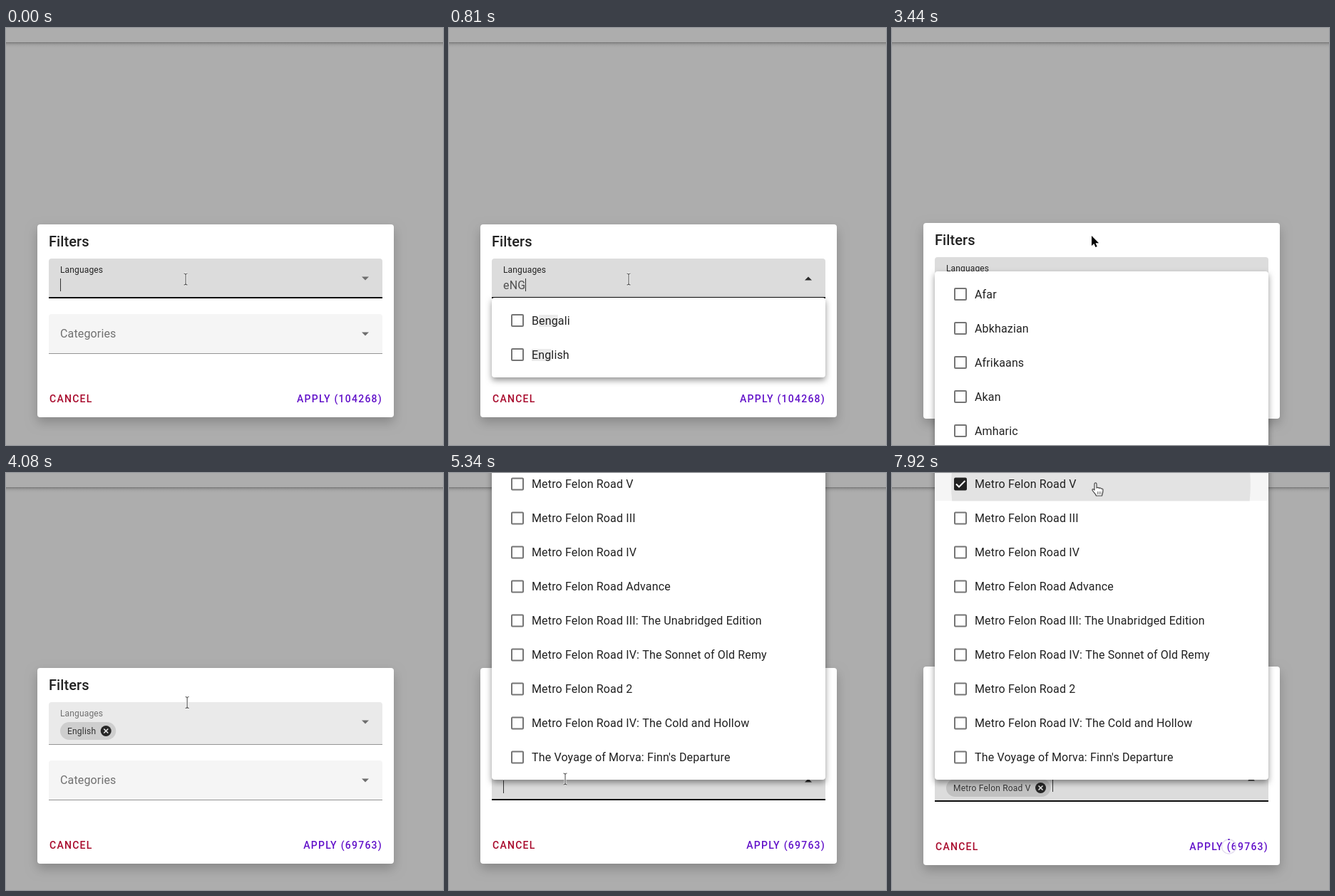
An HTML page with a canvas that plays this animation: 613x586 px, repeating every 8 s.

```html
<!DOCTYPE html>
<html lang="en">
<head>
<meta charset="utf-8">
<style>
html, body { margin: 0; width: 613px; height: 586px; overflow: hidden; background: #adadad; }
canvas { display: block; }
</style>
</head>
<body>
<canvas id="stage" width="613" height="586"></canvas>
<script>
const ctx = document.getElementById('stage').getContext('2d');
const LOOP = 8000, LEFT = 60, WIDTH = 468, CENTER = LEFT + WIDTH / 2;

const ALL_LANGUAGES = ['Afar', 'Abkhazian', 'Afrikaans', 'Akan', 'Amharic'];
const E_LANGUAGES = ['Aragonese', 'Assamese', 'Azerbaijani', 'Belarusian', 'Bengali'];
const EN_LANGUAGES = ['Bengali', 'English', 'French', 'Armenian'];
const SERIES = 'Metro Felon Road';
const GAMES = [
  ...['V', 'III', 'IV', 'Advance', 'III: The Unabridged Edition', 'IV: The Sonnet of Old Remy',
    '2', 'IV: The Cold and Hollow'].map(part => `${SERIES} ${part}`),
  "The Voyage of Morva: Finn's Departure"
];

const HAND = new Path2D('M-4-7c0-3 3-3 3 0v5c1-1 3-1 3.5 .5c1-1 2.5-.5 3 .7c1.5-.6 2.5 .3 2.5 1.8c0 4-1 5-1.5 8h-8c-1-3-3-4-5-7c-1.5-2 .5-3.5 2.5-1z');
const ARROW = new Path2D('M0 0v14l3.3-3 2.2 5 2.2-1-2.2-4.8h4.6z');
const BEAM = new Path2D('M-2.5-8Q0-8 0-6Q0-8 2.5-8M0-6V6M-2.5 8Q0 8 0 6Q0 8 2.5 8');

// time, x, y: the pointer eases between neighbouring stops
const POINTER = [
  [0, 252, 353], [1900, 252, 353], [2410, 201, 473], [2750, 201, 473], [3430, 280, 292],
  [3850, 280, 292], [4610, 163, 430], [6899, 163, 430], [6900, 240, 228],
  [7260, 366, 82], [7590, 288, 23], [LOOP, 288, 23]
];

const ramp = (t, from, to) => Math.min(1, Math.max(0, (t - from) / (to - from)));
const lerp = (a, b, p) => a + (b - a) * p;
const smooth = p => p * p * (3 - 2 * p);
const within = (t, from, to) => t >= from && t < to;

function box(x, y, w, h, color, radius = 0) {
  ctx.fillStyle = color;
  ctx.beginPath();
  ctx.roundRect(x, y, w, h, radius);
  ctx.fill();
}

function disc(x, y, r, color) {
  ctx.fillStyle = color;
  ctx.beginPath();
  ctx.arc(x, y, r, 0, 7);
  ctx.fill();
}

function line(color, width, ...points) {
  ctx.strokeStyle = color;
  ctx.lineWidth = width;
  ctx.beginPath();
  points.forEach(p => ctx.lineTo(...p));
  ctx.stroke();
}

function setFont(size, weight = 400, spacing = 0.15) {
  ctx.font = `${weight} ${size}px Roboto, sans-serif`;
  ctx.letterSpacing = spacing + 'px';
}

function text(str, x, y, color = '#212121') {
  ctx.fillStyle = color;
  ctx.fillText(str, x, y);
  return ctx.measureText(str).width;
}

function withShadow(offset, blur, alpha, draw) {
  ctx.save();
  ctx.shadowColor = `rgba(0,0,0,${alpha})`;
  ctx.shadowOffsetY = offset;
  ctx.shadowBlur = blur;
  draw();
  ctx.restore();
}

function backdrop() {
  box(0, 0, 613, 586, '#adadad');
  const shade = ctx.createLinearGradient(0, 20, 0, 28);
  shade.addColorStop(0, '#747474');
  shade.addColorStop(0.25, '#959595');
  shade.addColorStop(0.6, '#a7a7a7');
  shade.addColorStop(1, '#adadad');
  box(0, 20, 613, 8, shade);
}

function chip(label, y) {
  setFont(12, 400, 0.2);
  const w = ctx.measureText(label).width;
  box(76, y - 12, w + 38, 25, 'rgba(0,0,0,.12)', 12.5);
  text(label, 86, y + 4.5, '#333');
  const x = 100 + w;
  disc(x, y + 0.5, 7.5, '#262626');
  for (const s of [-1, 1]) line('#e4e4e4', 1.6, [x - 3, y + 0.5 - 3 * s], [x + 3, y + 0.5 + 3 * s]);
  return x + 16;
}

function field({ y, h, label, focus, hover, float, underline, open, value, tag, caret, typo }) {
  const grey = 245 - lerp(hover ? 11 : 0, 25, focus);
  box(LEFT, y, WIDTH, h, `rgb(${grey},${grey},${grey})`, [4, 4, 0, 0]);
  box(LEFT, y + h - 1, WIDTH, 1, '#949494');
  ctx.globalAlpha = Math.min(1, focus * 3);
  box(CENTER - WIDTH / 2 * underline, y + h - 2, WIDTH * underline, 2, '#0c0c0c');
  ctx.globalAlpha = 1;

  const size = lerp(16, 12, float), ink = lerp(112, 36, focus);
  setFont(size);
  text(label, 76, y + lerp(33, 20, float), `rgb(${ink},${ink},${ink})`);

  let caretX = 76;
  if (tag) caretX = chip(tag, y + 40);
  if (value) {
    setFont(16);
    caretX += text(value, 76, y + 43, '#505050');
    if (typo) {
      const wave = [];
      for (let x = 76; x <= caretX; x += 2) wave.push([x, y + 45.5 + (x / 2 % 2) * 2]);
      line('#e5383b', 1.1, ...wave);
    }
  }
  if (caret) box(Math.round(caretX), y + 28, 1, 18, '#333');

  const s = open ? -1 : 1, mid = y + 28;
  ctx.fillStyle = open ? '#2b2b2b' : '#6e6e6e';
  ctx.beginPath();
  ctx.moveTo(499, mid - 2.5 * s);
  ctx.lineTo(509, mid - 2.5 * s);
  ctx.lineTo(504, mid + 2.5 * s);
  ctx.fill();
}

function ripple(t, start, fromX, fromY, rowY) {
  if (t < start) return;
  const p = 1 - (1 - ramp(t, start, start + 225)) ** 2.3;
  ctx.save();
  ctx.beginPath();
  ctx.rect(LEFT, rowY - 24, WIDTH, 48);
  ctx.clip();
  box(LEFT, rowY - 24, WIDTH, 48, '#f5f5f5');
  disc(lerp(fromX, CENTER, p), lerp(fromY, rowY, p), lerp(47, 245, p),
    `rgba(0,0,0,${0.075 * ramp(t, start, start + 75)})`);
  ctx.restore();
}

function row(label, y, query, checked) {
  setFont(16);
  const at = query ? label.toLowerCase().indexOf(query) : -1;
  if (at >= 0) {
    const x = 116 + ctx.measureText(label.slice(0, at)).width;
    box(x, y - 8, ctx.measureText(label.slice(at, at + query.length)).width, 17, 'rgba(0,0,0,.08)');
  }
  text(label, 116, y + 5.5);
  if (checked) {
    box(87, y - 9, 18, 18, '#212121', 2);
    line('#fff', 2, [90, y], [94, y + 4], [102.5, y - 4.5]);
  } else {
    ctx.strokeStyle = '#757575';
    ctx.lineWidth = 2;
    ctx.beginPath();
    ctx.roundRect(88, y - 8, 16, 16, 1);
    ctx.stroke();
  }
}

function menu(top, height, first, rows, { alpha = 1, query, checked, under } = {}) {
  if (alpha <= 0) return;
  ctx.globalAlpha = alpha;
  withShadow(4, 9, 0.42, () => box(LEFT, top, WIDTH, height, '#fff', 4));
  if (under) under();
  rows.forEach((label, i) => row(label, first + 48 * i, query, i === checked));
  ctx.globalAlpha = 1;
}

function pointer(t) {
  if (within(t, 1380, 1940)) return;
  const i = POINTER.findIndex(stop => stop[0] > t);
  const [t0, x0, y0] = POINTER[i - 1], [t1, x1, y1] = POINTER[i];
  const p = smooth(ramp(t, t0, t1)), x = lerp(x0, x1, p), y = lerp(y0, y1, p);
  const onField = within(t, 3600, 6900) && (within(y, 322, 382) || within(y, 404, 460));
  const kind = t < 1940 || onField || (t < 2400 && y < 380) ? 'beam'
    : (t < 3440 && y > 343) || t >= 6900 ? 'hand' : 'arrow';

  ctx.save();
  ctx.translate(x, y);
  ctx.lineJoin = 'round';
  if (kind === 'beam') {
    ctx.strokeStyle = 'rgba(255,255,255,.8)';
    ctx.lineWidth = 3;
    ctx.stroke(BEAM);
    ctx.strokeStyle = '#555';
    ctx.lineWidth = 1.1;
    ctx.stroke(BEAM);
  } else if (kind === 'hand') {
    ctx.fillStyle = '#fff';
    ctx.fill(HAND);
    ctx.strokeStyle = '#444';
    ctx.lineWidth = 1.2;
    ctx.stroke(HAND);
    for (const dx of [0.5, 2.7, 4.9]) line('#666', 0.9, [dx, 3], [dx, 7]);
  } else {
    ctx.strokeStyle = '#fff';
    ctx.lineWidth = 2;
    ctx.stroke(ARROW);
    ctx.fillStyle = '#000';
    ctx.fill(ARROW);
  }
  ctx.restore();
  return kind === 'beam' ? y : 0;
}

function spinner(t, y) {
  const turn = (t - 7920) / 700 * Math.PI;
  ctx.lineWidth = 1.5;
  ctx.strokeStyle = 'rgba(225,218,238,.9)';
  ctx.beginPath();
  ctx.arc(472.5, y, 10, 0, 7);
  ctx.stroke();
  ctx.strokeStyle = '#5b16c4';
  ctx.lineWidth = 2;
  ctx.beginPath();
  ctx.arc(472.5, y, 10, -1.67 + turn, -1.47 + turn * 1.5);
  ctx.stroke();
}

function dialog(t) {
  const stage = t < 2650 ? 0 : t < 7900 ? 1 : 2;
  const top = 276 - 2 * stage, bottom = 547 + 2 * stage;
  withShadow(7, 16, 0.22, () => box(44, top, 500, bottom - top, '#fff', 4));
  setFont(20, 500, 0.1);
  text('Filters', 60, top + 31);

  const query = t < 180 ? '' : t < 580 ? 'e' : t < 810 ? 'eN' : 'eNG';
  const langHeight = stage ? 60 : 56, langY = top + 48;
  field({
    y: langY, h: langHeight, label: 'Languages', float: 1, underline: 1,
    focus: 1 - ramp(t, 3590, 3740), hover: within(t, 4000, 4180),
    open: within(t, 180, 3510), value: stage ? '' : query, tag: stage ? 'English' : '',
    caret: t < 3590 && !within(t, 1380, 1940), typo: t >= 1780
  });

  const focus = ramp(t, 5010, 5210);
  field({
    y: langY + langHeight + 22, h: stage === 2 ? 60 : 56, label: 'Categories',
    float: focus, focus, underline: 1 - (1 - focus) ** 2, hover: t >= 4340,
    open: t >= 5260, tag: stage === 2 ? GAMES[0] : '',
    caret: within(t, 5060, 5650) || within(t, 6230, 6860) || t >= 7400
  });

  setFont(14, 500, 1.25);
  text('CANCEL', 61, bottom - 21, '#a80a2c');
  const apply = `APPLY (${stage ? 69763 : 104268})`;
  text(apply, 528 - ctx.measureText(apply).width, bottom - 21, '#6110c9');
  if (t >= 7920) spinner(t, bottom - 26);
}

function menus(t) {
  if (t < 580) menu(342, 304, 374, E_LANGUAGES, { alpha: ramp(t, 150, 260), query: 'e' });
  else if (t < 810) menu(379, 256, 411, EN_LANGUAGES, { query: 'en' });
  else if (t < 2650) menu(379, 112, 411, EN_LANGUAGES.slice(0, 2), {
    query: 'eng', under: () => ripple(t, 2455, 201, 473, 459)
  });
  else if (t < 3600) menu(342, 304, 374, ALL_LANGUAGES, { alpha: 1 - ramp(t, 3500, 3600) });
  else menu(-30, 461, 15.5, GAMES, {
    alpha: ramp(t, 5180, 5340), checked: t >= 7900 ? 0 : -1,
    under: () => ripple(t, 7802, 288, 23, 15.5)
  });
}

function render(now) {
  const t = now % LOOP;
  backdrop();
  dialog(t);
  menus(t);
  pointer(t);
}

const started = performance.now();
(function frame() {
  render(performance.now() - started);
  requestAnimationFrame(frame);
})();
</script>
</body>
</html>
```
